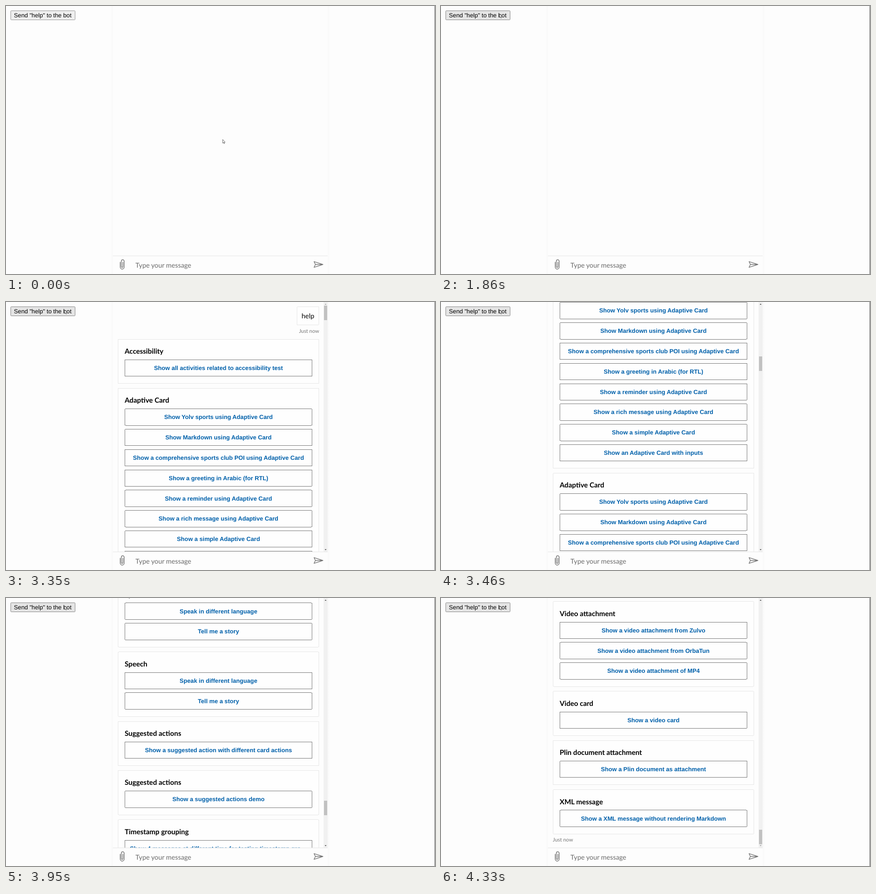
An HTML page for the animation above (5840 ms loop, 947 by 591 pixels).

```html
<!DOCTYPE html>
<html lang="en">
<head>
<meta charset="utf-8">
<title>Chat scroll</title>
<style>
  html, body { margin: 0; width: 100%; height: 100%; overflow: hidden; background: #fdfdfd; }
  svg { display: block; width: 947px; height: 591px; text-rendering: geometricPrecision; }
  text { white-space: pre; }
  .ui { font: 13.15px "Liberation Sans", Arial, sans-serif; fill: #000; }
  .action { font: bold 13.13px "Liberation Sans", Arial, sans-serif; fill: #0060aa; }
  .title { font: bold 15.5px Lato, sans-serif; fill: #000; }
  .body { font: 14.8px Lato, sans-serif; fill: #000; }
  .hint { font: 14.8px Lato, sans-serif; fill: #6b6b6b; }
  .status { font: 11.4px Lato, sans-serif; fill: #767676; }
  .card { fill: #fefefe; stroke: #e6e6e6; shape-rendering: crispEdges; }
  .box { fill: #fefefe; stroke: #767676; shape-rendering: crispEdges; }
  .icon { fill: none; stroke: #767676; stroke-linejoin: round; stroke-linecap: round; }
</style>
</head>
<body>
<svg id="stage" viewBox="0 0 947 591">
  <defs>
    <clipPath id="view"><rect x="236" y="0" width="474" height="551"/></clipPath>
    <linearGradient id="shade">
      <stop offset="0" stop-color="#000" stop-opacity=".018"/>
      <stop offset="1" stop-color="#000" stop-opacity="0"/>
    </linearGradient>
  </defs>
  <rect width="947" height="591" fill="#fdfdfd"/>
  <rect x="710" width="6" height="591" fill="url(#shade)"/>
  <rect x="-236" width="6" height="591" fill="url(#shade)" transform="scale(-1 1)"/>
  <rect x="946" width="1" height="591" fill="#666"/>

  <g clip-path="url(#view)">
    <g id="sent">
      <rect class="card" x="642.5" y="10.5" width="48" height="40" rx="1.5"/>
      <text class="body" x="652.6" y="35.6">help</text>
      <text class="status" id="sentStatus" x="691.3" y="68" text-anchor="end"></text>
    </g>
    <g id="cards"></g>
    <g id="bar">
      <rect x="701" width="9" height="551" fill="#f1f1f1"/>
      <path id="up" d="M703.5 6L705.5 3.6L707.5 6Z"/>
      <path id="down" d="M703.5 545L705.5 547.4L707.5 545Z"/>
      <rect id="thumb" x="702" width="7" height="32" fill="#c1c1c1"/>
    </g>
  </g>

  <rect x="236" y="550.5" width="474" height="1" fill="#e6e6e6"/>
  <path class="icon" stroke-width="1.5" d="M252.2 565V575.4a4.3 4.8 0 0 0 8.6 0V562.6a3.1 3.1 0 0 0-6.2 0V574.6a1.7 1.9 0 0 0 3.4 0V565"/>
  <text class="hint" x="285.8" y="577">Type your message</text>
  <path class="icon" stroke-width="1.4" d="M680 563.6L699.6 570L680 576.4L683 570ZM683 570H699"/>

  <rect id="send" x="10.5" y="10.5" width="142" height="20" rx="1"/>
  <text class="ui" x="17.6" y="24.6">Send "help" to the bot</text>
  <path id="cursor" fill="#fff" stroke="#444" stroke-width=".8" d="M.4.4V8.4L2.2 6.8L3.4 9.6L4.7 9L3.5 6.3H5.8Z"/>
</svg>
<script>
const LOOP = 5840;
const CURSOR_STEPS = [1200, 1290, 1390, 1480, 1580, 1670, 1770];
const SCROLL_STEPS = [3350, 3460, 3550, 3640, 3750, 3840, 3950, 4040, 4140, 4240, 4330];
const HOVER = 1770, PRESS = 2650, SENT = 2850, DELIVERED = 3050, REPLY = 3350;

// Every card is shown once per action it offers.
const MENU = [
  ["Accessibility", "Show all activities related to accessibility test"],
  ["Adaptive Card", "Show Yolv sports using Adaptive Card", "Show Markdown using Adaptive Card",
    "Show a comprehensive sports club POI using Adaptive Card", "Show a greeting in Arabic (for RTL)",
    "Show a reminder using Adaptive Card", "Show a rich message using Adaptive Card",
    "Show a simple Adaptive Card", "Show an Adaptive Card with inputs"],
  ["Audio card", "Show an audio card"],
  ["Carousel layout", "Show a carousel layout", "Show a single card in carousel layout", "Show two cards in carousel layout"],
  ["Document attachment", "Show a document as attachment", "Show a plain text document"],
  ["File upload", "Upload a file"],
  ["Hero card", "Show a hero card", "Show a hero card with a long title",
    "Show two hero cards with two sets of questions and answers"],
  ["Image attachment", "Show an image attachment", "Show a large image attachment"],
  ["Input hint", "Show a message with accepting input", "Show a message with expecting input", "Show a message with ignoring input"],
  ["List layout", "Show a list of cards"],
  ["Localization", "Show a message in another language"],
  ["Markdown", "Show a Markdown message", "Show a Markdown table", "Show a Markdown list"],
  ["Message back", "Show a message back action"],
  ["Post back", "Show a post back action"],
  ["Proactive message", "Show a proactive message"],
  ["Receipt card", "Show a receipt card"],
  ["Sign-in card", "Show a sign-in card"],
  ["Speech", "Speak in different language", "Tell me a story"],
  ["Suggested actions", "Show a suggested action with different card actions"],
  ["Suggested actions", "Show a suggested actions demo"],
  ["Timestamp grouping", "Show 4 messages at different time for testing timestamp gro…"],
  ["Typing indicator", "Show typing indicator"],
  ["Video attachment", "Show a video attachment from Zulvo", "Show a video attachment from OrbaTun", "Show a video attachment of MP4"],
  ["Video card", "Show a video card"],
  ["Plin document attachment", "Show a Plin document as attachment"],
  ["XML message", "Show a XML message without rendering Markdown"]
];
const FIRST_TOP = 81.8, CARD = 98, GAP = 10.4, PITCH = 44.8;

const $ = id => document.getElementById(id);

function add(parent, tag, attrs, text) {
  const el = document.createElementNS(parent.namespaceURI, tag);
  for (const key in attrs) el.setAttribute(key, attrs[key]);
  if (text) el.textContent = text;
  parent.appendChild(el);
}

function addCard(parent, top, title, actions) {
  const height = CARD + PITCH * (actions.length - 1);
  add(parent, "rect", { class: "card", x: 247.5, y: top + .2, width: 443, height: height - .4, rx: 1.5 });
  add(parent, "text", { class: "title", x: 262, y: top + 32.2 }, title);
  actions.forEach((label, i) => {
    const y = top + 45.5 + i * PITCH;
    const clipped = label.endsWith("…");
    add(parent, "rect", { class: "box", x: 262.5, y, width: 413, height: 36.4, rx: 1.5 });
    add(parent, "text", {
      class: "action", x: clipped ? 273.6 : 469, y: y + 22.7,
      "text-anchor": clipped ? "start" : "middle"
    }, label);
  });
  return height + GAP;
}

function buildCards() {
  const cards = $("cards");
  let top = FIRST_TOP;
  for (const [title, ...actions] of MENU)
    for (let i = 0; i < actions.length; i++) top += addCard(cards, top, title, actions);
  const end = top - GAP;
  add(cards, "text", { class: "status", x: 246.8, y: end + 17 }, "Just now");
  return end - 520.4;
}

const maxScroll = buildCards();

const stepsDone = (steps, t) => steps.filter(s => s <= t).length;

function cursorAt(t) {
  const k = stepsDone(CURSOR_STEPS, t);
  if (!k) return [478, 294];
  const u = (k + .44) / 7.44;
  const s = u * u * (3 - 2 * u);
  return [Math.round(478 - 349 * s), Math.round(294 - 277 * s ** 1.13)];
}

// Each 5 ms tick moves by the square root of the distance left.
function scrollAt(t) {
  const k = stepsDone(SCROLL_STEPS, t);
  if (!k) return 0;
  const ticks = Math.max(0, SCROLL_STEPS[k - 1] - REPLY - .2) / 5;
  return maxScroll - Math.max(0, Math.sqrt(maxScroll) - ticks / 2) ** 2;
}

function buttonLook(t) {
  if (t < HOVER) return ["#efefef", "#959595"];
  if (t >= PRESS && t < SENT) return ["#f5f5f5", "#ababab"];
  return ["#e5e5e5", "#858585"];
}

function show(id, on) {
  $(id).setAttribute("display", on ? "inline" : "none");
}

function move(id, x, y) {
  $(id).setAttribute("transform", `translate(${x} ${y})`);
}

function draw(t) {
  const replied = t >= REPLY;
  const scroll = scrollAt(t);
  const [fill, stroke] = buttonLook(t);
  $("send").setAttribute("fill", fill);
  $("send").setAttribute("stroke", stroke);
  move("cursor", ...cursorAt(t));

  show("sent", t >= SENT);
  show("cards", replied);
  show("bar", replied);
  $("sentStatus").textContent = t < DELIVERED ? "Sending" : "Just now";
  if (replied) move("sent", 0, -scroll);
  else move("sent", 9, 469.6);
  move("cards", 0, -scroll);

  const part = scroll / maxScroll;
  $("thumb").setAttribute("y", Math.round(8 + 502.5 * part));
  $("up").setAttribute("fill", part > 0 ? "#505050" : "#a3a3a3");
  $("down").setAttribute("fill", part < 1 ? "#505050" : "#a3a3a3");
}

const start = performance.now();
function tick() {
  draw((performance.now() - start) % LOOP);
  requestAnimationFrame(tick);
}
tick();
</script>
</body>
</html>
```
